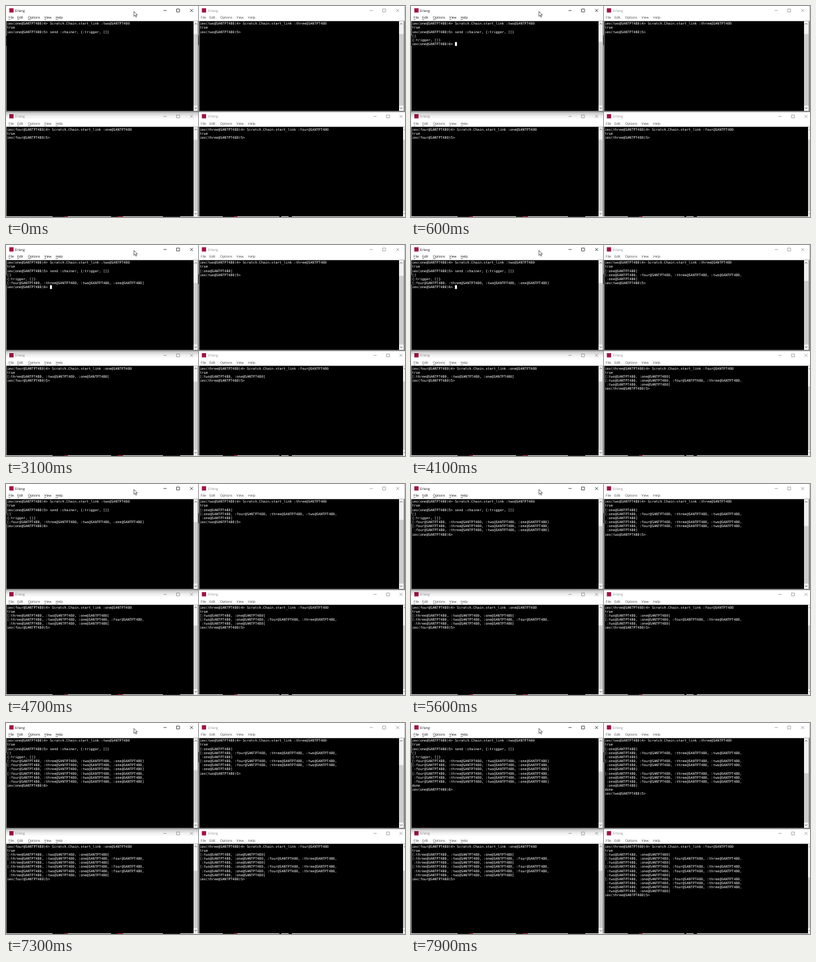
These frames come from a looping animation (600 px wide and 318 px high, 8 s). An HTML page:

```html
<!DOCTYPE html>
<html lang="en">
<head>
<meta charset="utf-8">
<title>Erlang node chain</title>
<style>
  html, body { margin: 0; width: 100%; height: 100%; overflow: hidden; background: #8a8a8a; }
  svg { display: block; width: 100%; height: 100%; }
  text { text-rendering: geometricPrecision; white-space: pre; }
  .ui { font: 5px "Open Sans", "Noto Sans", sans-serif; }
  .term { font: 5.12px "DejaVu Sans Mono", "Liberation Mono", monospace; fill: #fff; }
</style>
</head>
<body>
<svg id="stage" viewBox="0 0 600 318" preserveAspectRatio="none">
  <defs>
    <linearGradient id="shade" x1="0" y1="0" x2="0" y2="1">
      <stop offset="0" stop-color="#000" stop-opacity="0.24"/>
      <stop offset="0.5" stop-color="#000" stop-opacity="0.07"/>
      <stop offset="1" stop-color="#000" stop-opacity="0"/>
    </linearGradient>
  </defs>
</svg>
<script>
const NS = 'http://www.w3.org/2000/svg';
const stage = document.getElementById('stage');
const LOOP = 8000, ROW = 6.15, CHAR = 3.082;
const NAMES = ['one', 'two', 'three', 'four'];
const HOST = '@SANTPT480';

function add(tag, attrs, text) {
  const el = document.createElementNS(NS, tag);
  for (const key in attrs) el.setAttribute(key, attrs[key]);
  if (text !== undefined) el.textContent = text;
  stage.appendChild(el);
  return el;
}
const rect = (x, y, width, height, fill) => add('rect', { x, y, width, height, fill });
const line = (d, stroke, width = 0.7) =>
  add('path', { d, stroke, 'stroke-width': width, fill: 'none' });
const label = (x, y, text, fill) => add('text', { x, y, fill, class: 'ui' }, text);

// x, y, w: window; mid: title centre; cy, bottom: console; bar: scrollbar left and right
// btn: minimise, maximise, close
const LEFT = { x: 0, w: 289, bar: [282, 288.2], btn: [239.2, 258.7, 279],
  icon: 5, title: 13.7, menu: [4, 17, 33, 57.5, 74.5], keys: true };
const RIGHT = { x: 290, w: 309.5, bar: [591, 598], btn: [549.3, 568.7, 589],
  icon: 294.5, title: 304, menu: [293, 306, 322, 346.5, 364] };
const TOP = { y: 0, mid: 6.8, cy: 23, bottom: 158 };
const LOW = { y: 160, mid: 166.4, cy: 182.3, bottom: 317 };
const WINDOWS = [
  { ...LEFT, ...TOP, active: true },
  { ...RIGHT, ...TOP },
  { ...RIGHT, ...LOW, w: 310, bar: [597, 600], btn: [555, 574.3, 594] },
  { ...LEFT, ...LOW }
];

function drawWindow(win) {
  const { x, y, w, mid, cy, bottom } = win;
  const ink = win.active ? '#111' : '#8c8c8c';
  rect(x, y, w, cy - 0.5 - y, '#fff');
  rect(win.icon, mid - 3.4, 6.4, 6.4, '#a3123f');
  label(win.title, mid + 1.8, 'Erlang', ink);

  const [min, max, close] = win.btn;
  line(`M${min - 2.4} ${mid}h4.8`, ink);
  line(`M${max - 2.2} ${mid - 2.2}h4.4v4.4h-4.4z`, ink);
  line(`M${close - 2.2} ${mid - 2.2}l4.4 4.4m0 -4.4l-4.4 4.4`, ink);

  ['File', 'Edit', 'Options', 'View', 'Help'].forEach((word, i) => {
    const item = label(win.menu[i], y + 19.3, word, win.active ? '#111' : '#444');
    if (!win.keys) return;
    item.textContent = '';
    const key = document.createElementNS(NS, 'tspan');
    key.setAttribute('text-decoration', 'underline');
    key.textContent = word[0];
    item.append(key, word.slice(1));
  });

  const [bx, right] = win.bar;
  rect(x + 1, cy, bx - x - 1, bottom - cy, '#000');
  rect(bx, cy, right - bx, bottom - cy, '#f0f0f0');
  win.thumb = rect(bx, cy, right - bx, 10, '#cdcdcd');
  line(`M${bx + 1.5} ${cy + 4.8}l1.8 -1.8l1.8 1.8`, '#444', 0.8);
  line(`M${bx + 1.5} ${bottom - 5}l1.8 1.8l1.8 -1.8`, '#444', 0.8);
}

// Hop n prints the n nodes already visited, newest first, four to a line.
const hopTime = n => Math.ceil((560 + 520 * n) / 100) * 100;

function visited(n) {
  const items = Array.from({ length: n }, (_, i) => ':' + NAMES[(n - 1 - i) % 4] + HOST);
  const rows = [];
  for (let i = 0; i < n; i += 4) rows.push((i ? ' ' : '[') + items.slice(i, i + 4).join(', '));
  return (rows.join(',\n') || '[') + ']';
}

const prompt = (node, n) => `iex(${NAMES[node]}${HOST})${n}>`;

function linesAt(node, t) {
  const next = NAMES[(node + 1) % 4];
  const rows = [`${prompt(node, 4)} Scratch.Chain.start_link :${next}${HOST}`, 'true'];
  let count = 5;
  if (node === 0) {
    rows.push(prompt(0, 5) + ' send :chainer, {:trigger, []}');
    if (t < hopTime(0)) return rows;
    count = 6;
  }
  for (let n = node; hopTime(n) <= t; n += 4) {
    rows.push(...visited(n).split('\n'));
    if (n === 0) rows.push('{:trigger, []}');
    if (n >= 12 && hopTime(n + 1) <= t) rows.push('done');
  }
  rows.push(prompt(node, count));
  return rows;
}

WINDOWS.forEach(drawWindow);
add('rect', { x: 0, y: 160, width: 289, height: 11, fill: 'url(#shade)' });
WINDOWS.forEach(win => {
  win.rows = Array.from({ length: 16 }, (_, i) =>
    add('text', { x: win.x + 1.4, y: win.cy + 5.3 + i * ROW, class: 'term' }, ''));
});
line('M0.4 45V60M289.5 44V59', '#111', 0.9);
rect(0, 317, 600, 1, '#e4e4e4');
line('M70 317.5h22M158 317.5h10M236 317.5h26M326 317.5h18M411 317.5h3M425 317.5h5', '#222', 1);
line('M88 317.5h5M168 317.5h8M343 317.5h5', '#c03048', 1);

const cursor = rect(0, 0, 3, 5.8, '#fff');
add('path', {
  d: 'M192.3 8.2v7.4l1.8-1.6 1.2 2.8 1.2-.5-1.2-2.8h2.3z',
  fill: '#fff', stroke: '#111', 'stroke-width': 0.6
});

const BLINKS = [[500, 1100], [1700, 2200], [2700, 3200], [3700, 4200],
  [4800, 5300], [5800, 6300], [6800, 7300]];

// The thumb shows the share of 22 visible rows in a growing buffer scrolled to its end.
function scroll(win, count) {
  const from = win.cy + 7, to = win.bottom - 8;
  const top = from + (to - from) * (1 - 22 / (count + 21.5));
  win.thumb.setAttribute('y', top);
  win.thumb.setAttribute('height', to - top);
}

function render(t) {
  WINDOWS.forEach((win, node) => {
    const rows = linesAt(node, t);
    win.rows.forEach((el, i) => { el.textContent = rows[i] || ''; });
    scroll(win, rows.length);
    if (node === 0) {
      const last = rows.length - 1;
      const col = rows[last].length + (rows[last].endsWith('>') ? 1 : 0);
      cursor.setAttribute('x', 1.4 + col * CHAR);
      cursor.setAttribute('y', win.cy + 0.6 + last * ROW);
    }
  });
  const lit = BLINKS.some(([on, off]) => t >= on && t < off);
  cursor.setAttribute('visibility', lit ? 'visible' : 'hidden');
}

const start = performance.now();
let shown = -1;
function frame() {
  const tick = Math.floor(((performance.now() - start) % LOOP) / 100) * 100;
  if (tick !== shown) render(shown = tick);
  requestAnimationFrame(frame);
}
frame();
</script>
</body>
</html>
```
